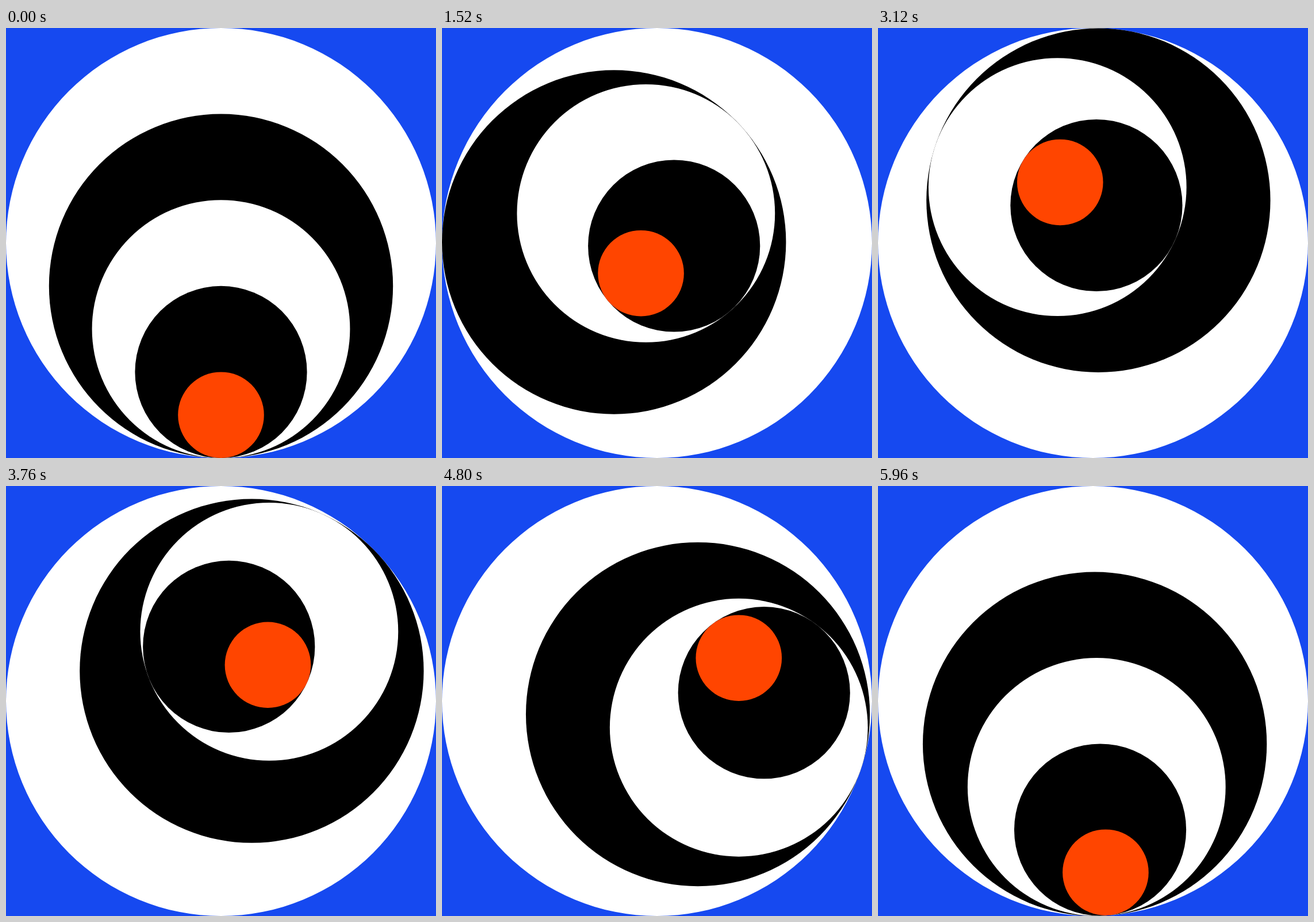
Animation of 748 by 748 pixels, one loop 6000 ms. Source, as an HTML page with a canvas:

```html
<!DOCTYPE html>
<html lang="en">
<head>
<meta charset="utf-8">
<title>Nested circles</title>
<style>
  html, body { margin: 0; width: 100%; height: 100%; overflow: hidden; background: #1649f0; }
  canvas { display: block; width: 748px; height: 748px; }
</style>
</head>
<body>
<canvas id="stage" width="748" height="748"></canvas>
<script>
const SIZE = 748;
const LOOP = 6000;
const TICK = 40;
const STEP = SIZE / 10;
const BLUE = '#1649f0';

// Each ring rolls inside the one before it; turn = ms for one revolution, then it rests.
const rings = [
  { color: '#000', turn: 6000 },
  { color: '#fff', turn: 4000 },
  { color: '#000', turn: 6000 },
  { color: '#ff4500', turn: 6000 }
];

const ctx = document.getElementById('stage').getContext('2d');

function disc(x, y, r, color) {
  ctx.fillStyle = color;
  ctx.beginPath();
  ctx.arc(x, y, r, 0, Math.PI * 2);
  ctx.fill();
}

function draw(t) {
  let x = SIZE / 2, y = SIZE / 2, r = SIZE / 2, angle = 0;
  ctx.fillStyle = BLUE;
  ctx.fillRect(0, 0, SIZE, SIZE);
  disc(x, y, r, '#fff');
  for (const { color, turn } of rings) {
    angle += Math.min(t / turn, 1) * Math.PI * 2;
    x -= Math.sin(angle) * STEP;
    y += Math.cos(angle) * STEP;
    r -= STEP;
    disc(x, y, r, color);
  }
}

const start = performance.now();

function frame() {
  const t = (performance.now() - start) % LOOP;
  draw(Math.floor(t / TICK) * TICK);
  requestAnimationFrame(frame);
}

frame();
</script>
</body>
</html>
```
